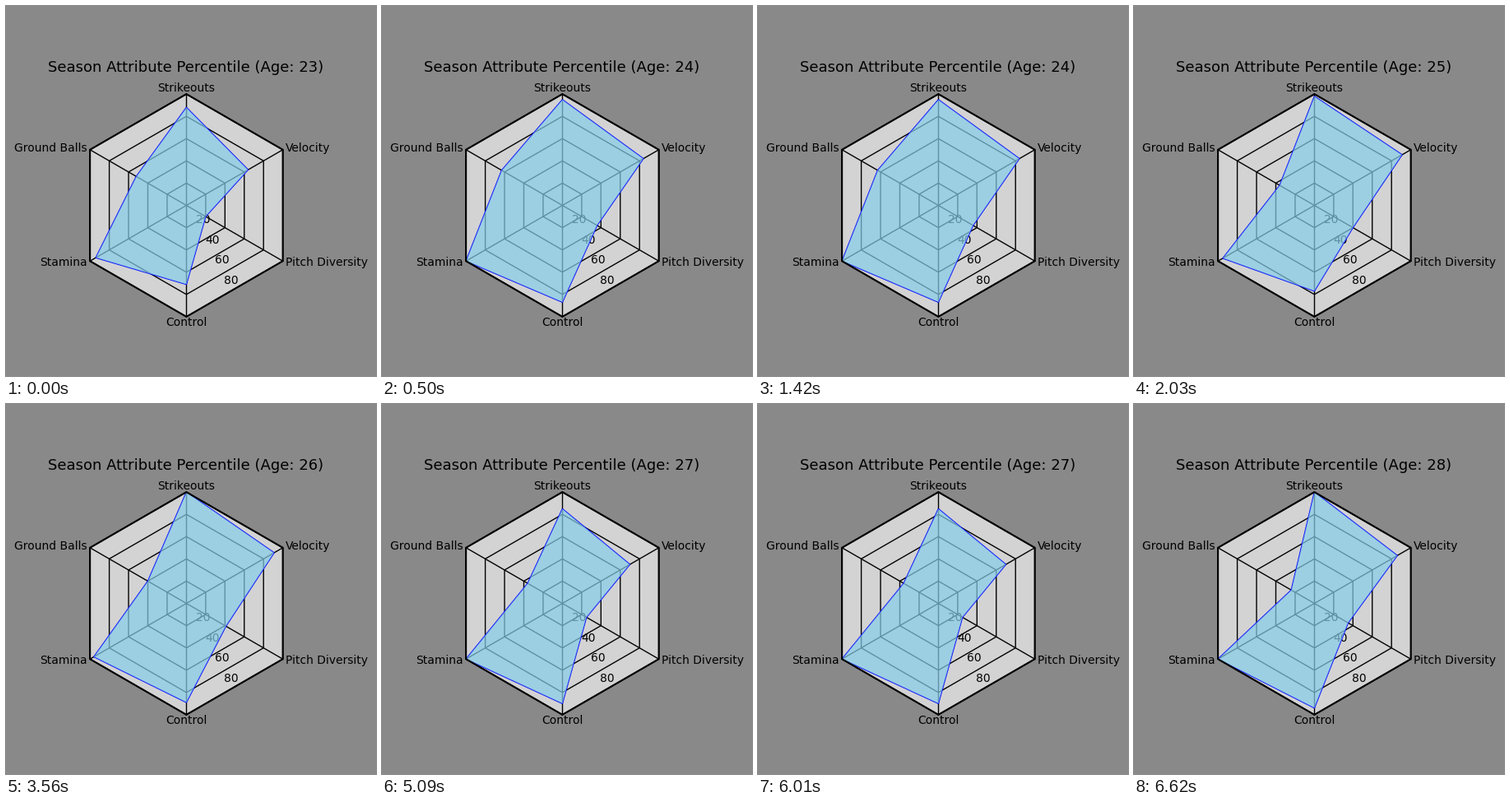
Animation, 450 px wide and 450 px high, one loop 8 s. Source, as a matplotlib script:

```python
import numpy as np
import matplotlib.pyplot as plt
from matplotlib.animation import FuncAnimation

SIZE, DPI = 450, 100
LOOP, STEP = 8000, 20               # ms
FIRST_HOLD, HOLD = 500, 1530        # ms per season
CX, CY, R = 219.4, 242.5, 135.4

# Strikeouts, Velocity, Pitch Diversity, Control, Stamina, Ground Balls
SEASONS = {
    23: (88, 64, 20, 71, 94, 52),
    24: (95, 84, 36, 87, 100, 63),
    25: (98, 91, 40, 77, 95, 36),
    26: (100, 91, 41, 89, 96, 40),
    27: (85, 70, 25, 90, 100, 36),
    28: (100, 86, 35, 94, 100, 24),
}
AGES = sorted(SEASONS)
ANGLES = np.radians(np.arange(0, 360, 60))   # clockwise from the top


def point(value, angle):
    r = R * np.asarray(value) / 100
    return np.column_stack([CX + r * np.sin(angle), CY - r * np.cos(angle)])


def ring(value):
    return point(np.full(6, value), ANGLES)


plt.rcParams["font.family"] = "DejaVu Sans"
fig = plt.figure(figsize=(SIZE / DPI, SIZE / DPI), dpi=DPI, facecolor="#898989")
ax = fig.add_axes([0, 0, 1, 1])
ax.set(xlim=(0, SIZE), ylim=(SIZE, 0))
ax.axis("off")


def polygon(xy, **style):
    return ax.add_patch(plt.Polygon(xy, closed=True, **style))


def label(x, y, text, ha="center", size=10, z=4):
    return ax.text(x, y, text, ha=ha, va="baseline", fontsize=size, zorder=z)


# Board, rings and spokes
board = polygon(ring(100), fc="lightgray", ec="none", zorder=0)
for value in (20, 40, 60, 80, 100):
    polygon(ring(value), fill=False, ec="black", lw=1, zorder=0.5)
for a in ANGLES[:3]:
    ends = point([100, -100], a)
    ax.plot(ends[:, 0], ends[:, 1], color="black", lw=1,
            solid_capstyle="butt", zorder=0.5)
polygon(ring(100), fill=False, ec="black", lw=1.5, zorder=3)

for value in (20, 40, 60, 80):
    x, y = point([value], np.radians(155))[0]
    label(x, y - 3, str(value), ha="left", z=0.6)

label(CX, 104, "Strikeouts")
label(339.7, 177, "Velocity", ha="left")
label(339.7, 316, "Pitch Diversity", ha="left")
label(CX, 389, "Control")
label(99, 316, "Stamina", ha="right")
label(99, 177, "Ground Balls", ha="right")
title = label(CX - 0.4, 80, "", size=13)

# The fill lies over the inner half of the outline
outline = polygon(ring(0), fill=False, ec="blue", lw=1, zorder=2)
area = polygon(ring(0), fc="skyblue", ec="none", alpha=0.7, zorder=2.1)
for shape in (outline, area):
    shape.set_clip_path(board)


def update(i):
    season = (i * STEP + STEP // 2 - FIRST_HOLD) // HOLD + 1
    age = AGES[season]
    xy = point(SEASONS[age], ANGLES)
    outline.set_xy(xy)
    area.set_xy(xy)
    title.set_text(f"Season Attribute Percentile (Age: {age})")
    return outline, area, title


anim = FuncAnimation(fig, update, frames=LOOP // STEP, interval=STEP,
                     repeat=True, repeat_delay=0)
plt.show()
```
